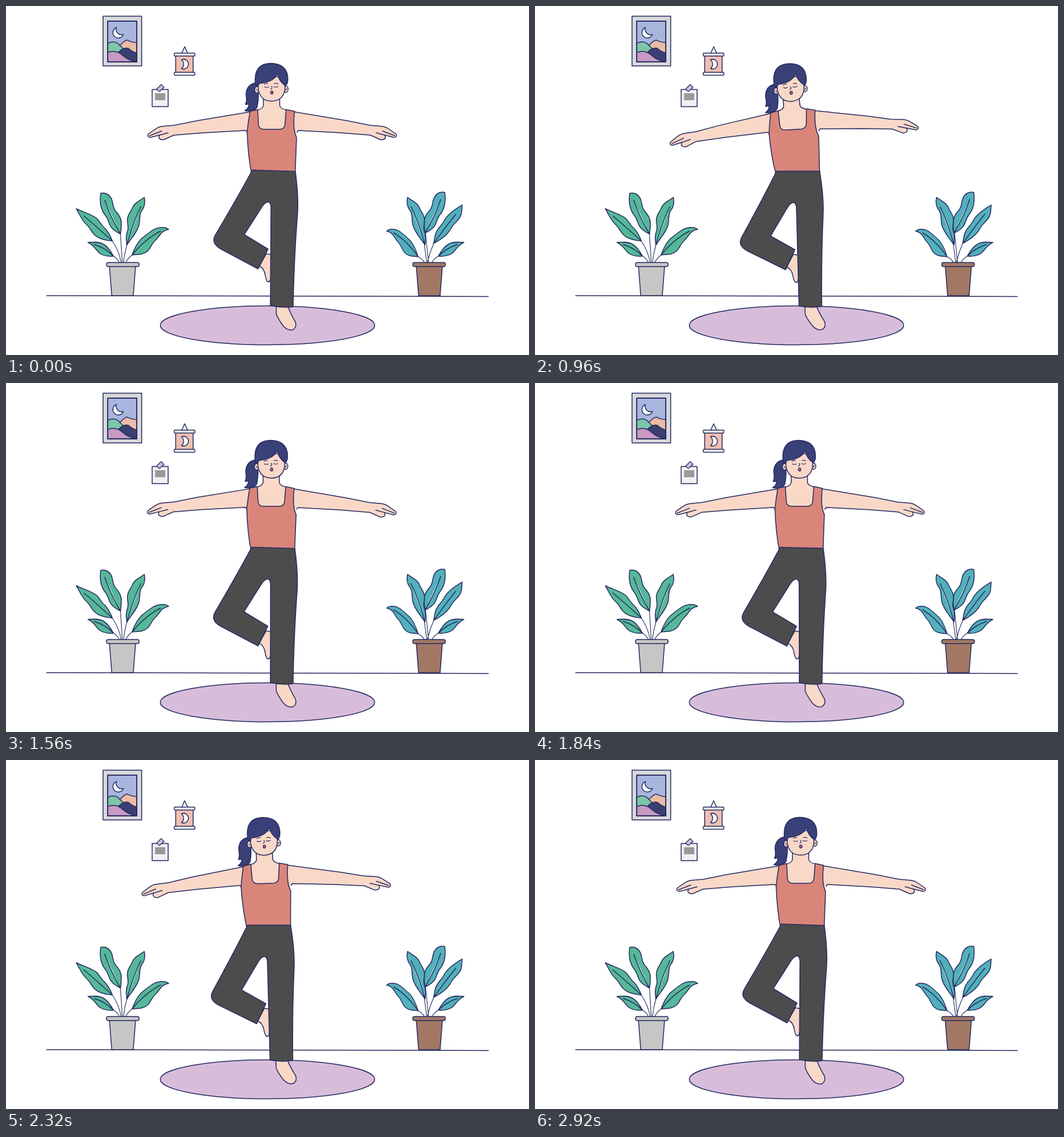
Animation, 900 px wide and 600 px high, one loop 3000 ms. Source, as an HTML page:

```html
<!DOCTYPE html>
<html lang="en">
<head>
<meta charset="utf-8">
<title>Balance pose</title>
<style>
  html, body { margin: 0; width: 100%; height: 100%; overflow: hidden; background: #fff; }
  svg { display: block; width: 900px; height: 600px; }
  .line { fill: none; }
  .skin { fill: #f9d8c8; }
  .hair { fill: #3a4078; }
</style>
</head>
<body>
<svg viewBox="0 0 900 600" stroke="#252a60" stroke-width="1.5" stroke-linejoin="round" stroke-linecap="round">
  <defs>
    <path id="leafA" d="M121 348.500C132 354 147 358 156 365C162 371 163 376 170 382C177 389 180 396 183 404C172 403 159 400 152 393C147 388 145 382 140 377C130 369 127 358 121 348.500ZM134 361C150 374 165 388 183 404"/>
    <path id="leafB" d="M163 322C172 320 179 325 182 333C185 341 183 346 189 353C196 361 199 367 198.500 376C198 383 198 387 197 392C189 388 182 384 179 377C176 371 176 366 171 360C163 350 161 336 163 322ZM170 334C177 355 187 375 197 392"/>
    <path id="leafC" d="M238 329C240 338 238 346 234 351C229 357 231 366 229 376C226 389 215 400 208 411C207 402 206 395 209 387C212 380 208 374 209 366C210 358 214 355 217 348C220 339 230 335 238 329ZM232 345C222 365 214 390 208 411"/>
    <path id="leafD" d="M280 384C272 378 258 381 250 387C243 392 239 395 233 400C226 407 221 417 217 428C226 427 236 428 244 421C250 415 250 409 257 403C264 397 266 386 280 384ZM266 387C248 396 230 412 217 428"/>
    <path id="leafE" d="M141 406.500C150 406 160 405 167 409C174 413 180 421 185 430C176 431 167 429 161 425C154 419 152 411 141 406.500ZM152 410C165 414 176 421 185 430"/>
    <g id="pot">
      <path d="M178 447L182 498H219L223 447Z"/>
      <rect x="173" y="441" width="56" height="7" rx="3"/>
    </g>
    <g id="arm">
      <path class="skin" stroke="none" d="M458 179H432L420 182L330 197L290 205L414 214L440 230H458Z"/>
      <path class="skin" d="M432 179L420 182L330 197L290 205L268 207Q262 208 258 211L245 220Q242 225 248 226L264 222L263 226Q264 230 271 230L289 222L340 218L412 214Q414 214 415 217"/>
      <path class="line" d="M247 223L268 215M264 222L279 218"/>
    </g>
  </defs>

  <!-- Wall pictures -->
  <path fill="#d8d8da" d="M167 17.5H233.5V103H167Z"/>
  <path fill="#a8b6df" d="M175 26H225V96H175Z"/>
  <path fill="#ebbba6" d="M196 68Q204 59 209 58.5Q214 62 225 63V82H196Z"/>
  <path fill="#7cc6a9" d="M175 64Q189 58 196 68Q201 72 203 75L193 82H175Z"/>
  <path fill="#3a3f72" d="M193 80Q203 70 211 73Q216 78 225 81V96H205Z"/>
  <path fill="#c799c4" d="M175 80Q190 74 202 86Q211 94 225 96H175Z"/>
  <path class="line" d="M175 26H225V96H175Z"/>
  <path fill="#fff" d="M190 37A9.3 9.3 0 1 0 202 49A9.5 9.5 0 0 1 190 37Z"/>

  <path class="line" d="M302.5 81L307.5 70L312.5 81"/>
  <path fill="#eebfb1" d="M292 84H322V116H292Z"/>
  <g fill="#fff">
    <rect x="289.5" y="81" width="35.5" height="5" rx="1"/>
    <rect x="289.5" y="114" width="35.5" height="5" rx="1"/>
    <path d="M302 92.5A8.3 8.3 0 1 1 302 107.5A9.5 9.5 0 0 0 302 92.5Z"/>
  </g>

  <path fill="#f0f0f2" d="M251.5 143.5H279V173H251.5Z"/>
  <path fill="#999" stroke="none" d="M256.5 150H274V162H256.5Z"/>
  <path fill="#d3b9dc" stroke-width="1.2" d="M259 143L267 135L272 140L264 147Z"/>

  <!-- Floor, mat, plants -->
  <path class="line" d="M70 498L830 499.500"/>
  <ellipse cx="450" cy="549" rx="184.5" ry="33.5" fill="#d8bddb"/>

  <path class="line" stroke-width="1.1" d="M183 404Q195 422 198 441M197 392L200 441M208 411Q204 425 202 441M217 428Q210 433 206 441M185 430Q192 434 195 441"/>
  <g fill="#55b899">
    <use href="#leafA"/><use href="#leafB"/><use href="#leafC"/><use href="#leafD"/><use href="#leafE"/>
  </g>
  <use href="#pot" fill="#c6c6c6"/>

  <path class="line" stroke-width="1.1" d="M736 408Q729 424 725 441M722 391L727 441M720 411L724 441M709 431Q717 435 720 441M744 430Q737 434 733 441"/>
  <g fill="#52b0bb">
    <path d="M785 342C784 352 785 358 780 365C775 372 770 374 766 382C760 394 748 402 736 408C738 398 738 392 742 386C746 379 749 378 753 371C759 358 773 350 785 342ZM774 358C760 375 748 392 736 408"/>
    <use href="#leafD" transform="matrix(-.86 0 0 1 895.8 3)"/>
    <g transform="matrix(-1 0 0 1 929 0)">
      <use href="#leafB" x="11" y="-1.500"/><use href="#leafC"/><use href="#leafE"/>
    </g>
  </g>
  <use href="#pot" fill="#a27865" transform="matrix(-1 0 0 1 929 0)"/>

  <!-- Woman -->
  <g id="upper">
    <path class="hair" d="M431 132Q414 134 413 152Q415 165 412 169Q415 170 418 168Q418 176 411 180Q426 183 432 174Q435 160 434 148Z"/>
    <use href="#arm"/>
    <use href="#arm" transform="matrix(-1 0 0 1 916 0)"/>
    <path class="skin" stroke="none" d="M443 155H471V171Q472 177 484 180V215H432V180Q442 177 443 171Z"/>
    <path class="line" d="M443 158V171Q442 177 432 179M471 158V171Q472 177 484 179"/>
    <path fill="#d9857a" d="M420 181L433 178L434.500 204Q435 211 443 212H472Q479 211 480 204L482 178L496.500 181Q494 205 497 217Q498 222 500 226L497.500 291H423Q416 255 415 216Q417 198 420 181Z"/>
    <ellipse class="skin" cx="432" cy="144" rx="4" ry="5.500"/>
    <ellipse class="skin" cx="481.500" cy="143" rx="4" ry="5.500"/>
    <path class="skin" d="M434 125V142Q437 163.500 457 163.500Q478 163 480 142V120Z"/>
    <path class="hair" d="M433 138Q430 138 429 133Q426 99 455 98.500Q485 99 485 126Q485 134 481 137Q470 130 467 116Q461 131 436 133Z"/>
    <g class="line" stroke-width="1.2">
      <path d="M445 139q3.500 2 7 0M461 138.500q3.500 2 7 0M444.500 134.500q3 -2 6 -1M462 133.500q3 -1.500 6 .5M457 138q2 4 -1.500 5"/>
      <path d="M431 143l2 3M483 142l-2 3"/>
    </g>
    <ellipse cx="457.500" cy="148.800" rx="2.100" ry="2.600" fill="#b8687c" stroke-width="1.300"/>
  </g>
  <g id="legs">
    <path class="skin" d="M448 426L460 428L456 464Q455 476 450 474Q447 470 446 462Q444 451 436 447Z"/>
    <path class="skin" d="M465 513V529Q467 536 477 550Q485 559 494 556.500Q501 552 498 543Q490 530 484 514Z"/>
    <path fill="#4d4c4d" d="M424 282L498 284.500Q504 330 501.500 360Q496 430 494 517Q475 519.500 455 515L456 345Q455 336 450 337Q445 338 440 346L410 393L451 418L434 452L370 418Q352 408 360 394Q395 335 424 282Z"/>
  </g>
</svg>
<script>
  const LOOP = 3000, STEP = 40;
  const upper = document.getElementById("upper");
  const legs = document.getElementById("legs");

  // [time in ms, value]: sideways hip shift in px, torso lean in degrees
  const hipKeys = [[340, 0], [1000, -8.2], [1660, -.5], [2290, -8.2], [2920, 0]];
  const leanKeys = [[340, 0], [500, 1], [1000, -3.7], [1360, 1.2], [1700, -.4], [2020, .3], [2560, -3.6], [2920, 0]];

  function sample(keys, t) {
    const i = keys.findIndex(key => key[0] > t);
    if (i < 1) return 0;
    const [t0, a] = keys[i - 1], [t1, b] = keys[i];
    return a + (b - a) * (1 - Math.cos(Math.PI * (t - t0) / (t1 - t0))) / 2;
  }

  function draw(now) {
    const t = Math.floor(now % LOOP / STEP) * STEP;
    const hip = sample(hipKeys, t);
    const lean = sample(leanKeys, t);
    const sway = Math.asin(hip / 250) * 180 / Math.PI;
    legs.setAttribute("transform", `rotate(${sway} 480 534)`);
    upper.setAttribute("transform", `translate(${hip} 0) rotate(${lean} 460 283)`);
    requestAnimationFrame(draw);
  }
  requestAnimationFrame(draw);
</script>
</body>
</html>
```
